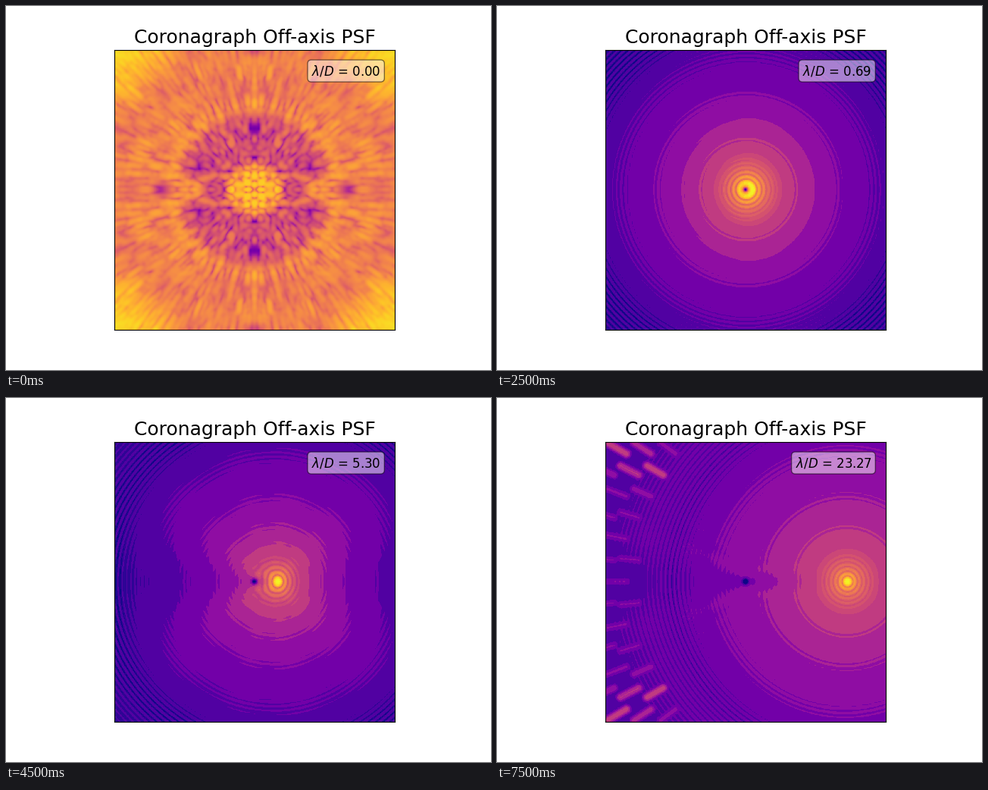
Recreate the animation shown at these times as a matplotlib script. Size 640 px wide and 480 px high, loop 8 s.

```python
import numpy as np
import matplotlib.pyplot as plt
from matplotlib.animation import FuncAnimation
from matplotlib.colors import ListedColormap

# Off-axis response of a charge-6 vortex coronagraph, 10% bandwidth.
# All lengths are in units of lambda/D.
HALF = 32.0
NPIX = 256
CHARGE = 6
WAVES = np.linspace(0.95, 1.05, 5)
OFFSETS = [0, 0.13, 0.23, 0.33, 0.49, 0.69, 1.04, 1.60, 2.63, 5.30,
           8.27, 11.27, 14.27, 17.27, 20.27, 23.27]
PX = 2 * HALF / 369.6  # lambda/D per screen pixel

ax1 = (np.arange(NPIX) + 0.5) / NPIX * 2 * HALF - HALF
X, Y = np.meshgrid(ax1, ax1)
R = np.hypot(X, Y)

DR = 0.1
r_polar = np.arange(0, 46.5, DR)
N_TH = 601
theta = np.clip(np.linspace(0, np.pi, N_TH), 1e-4, np.pi - 1e-4)
orders = np.arange(CHARGE // 2 + 1, 121)
# Chebyshev U of the shifted order: the vortex lowers each term by charge/2
cheb = np.sin(np.outer(orders - CHARGE // 2, theta)) / np.sin(theta)


def bessel(x):
    """J_n(x) for every needed order, from the generating function."""
    tau = 2 * np.pi * np.arange(512) / 512
    wave = np.exp(1j * np.outer(x, np.sin(tau)))
    return (np.fft.fft(wave, axis=1).real / 512)[:, orders]


def over_x(x):
    x = np.maximum(np.atleast_1d(x), 1e-3)
    return bessel(x) / x[:, None]


radial = [over_x(np.pi * r_polar / w) for w in WAVES]

# bilinear lookup from the polar grid to the pixels
fr = R / DR
ft = np.abs(np.arctan2(Y, X)) / np.pi * (N_TH - 1)
ir = fr.astype(int)
it = np.minimum(ft.astype(int), N_TH - 2)
fr, ft = fr - ir, ft - it


def to_pixels(p):
    lo = p[ir, it] * (1 - ft) + p[ir, it + 1] * ft
    hi = p[ir + 1, it] * (1 - ft) + p[ir + 1, it + 1] * ft
    return lo * (1 - fr) + hi * fr


def vortex_psf(alpha):
    total = 0
    for w, table in zip(WAVES, radial):
        coef = 4 * orders * over_x(np.pi * alpha / w)[0]
        total = total + ((table * coef) @ cheb) ** 2
    return 10 ** to_pixels(np.log10(total / len(WAVES) + 1e-18))


def step(x, a, b):
    t = np.clip((x - a) / (b - a), 0, 1)
    return t * t * (3 - 2 * t)


def speckles():
    """Residual on-axis light, mirror symmetric, as colour values 0..1."""
    rng = np.random.default_rng(11)
    n = 260
    k = np.pi * np.sqrt(rng.random(n))
    ang = rng.random(n) * np.pi / 2
    amp = rng.normal(size=n) + 1j * rng.normal(size=n)
    u, v = k * np.cos(ang), k * np.sin(ang)
    light = 0
    for w in np.linspace(0.95, 1.05, 9):
        cx = np.cos(np.outer(ax1 / w, u))
        cy = np.cos(np.outer(ax1 / w, v))
        light = light + np.abs((cy * amp) @ cx.T) ** 2
    grain = np.log10(light / np.median(light))

    x, y, r = np.abs(X) / PX, np.abs(Y) / PX, R / PX
    up = (y / (r + 1)) ** 2
    base = 0.69 + 0.0 * r
    ring = step(r, 28, 40) * (1 - step(r, 92, 108))
    base -= ring * (0.08 + 0.07 * up)
    base += 0.11 * (1 - step(r, 28, 40))
    base += 0.04 * np.exp(-((r - 112) / 8) ** 2)
    base += 0.24 * step(x * y / 185 ** 2, 0.4, 0.95)

    def spot(px, py, sx, sy, h):
        return h * np.exp(-((x - px) / sx) ** 2 - ((y - py) / sy) ** 2)

    base += spot(0, 81, 7, 9, -0.42) + spot(120, 0, 14, 10, -0.32)
    base += spot(63, 32, 20, 11, -0.16) + spot(0, 184, 14, 8, -0.22)
    base += spot(155, 0, 14, 12, -0.08) + spot(88, 0, 16, 9, 0.12)
    contrast = 0.16 + 0.04 * ring
    return np.clip(base + contrast * np.clip(grain, -2, 0.6), 0.02, 0.95)


def dashes(alpha):
    """Wavelength-smeared hexagonal grid orders far from the star."""
    out = np.zeros_like(X)
    dx = 33.8 * PX
    dy = dx * np.sqrt(3) / 2
    for row in range(-6, 7):
        for col in range(5, 11):
            gx, gy = -(col - 0.5 * (row % 2)) * dx, row * dy
            dist = np.hypot(gx, gy)
            if dist < 48.8 or dist > 62 or alpha + gx < -HALF - 4:
                continue
            ux, uy = gx / dist, gy / dist
            rx, ry = X - alpha - gx, Y - gy
            along = np.abs(rx * ux + ry * uy)
            d2 = (np.maximum(along - 0.042 * dist, 0) ** 2
                  + (rx * uy - ry * ux) ** 2)
            deg = np.degrees(np.arctan2(abs(gy), -gx))
            level = -5.8 + 1.6 * np.exp(-((deg - 29.5) / 5) ** 2)
            out += 10 ** level * np.exp(-d2 / 0.5 ** 2)
    return out


RESIDUAL = speckles()


def picture(alpha):
    if alpha == 0:
        return RESIDUAL
    light = vortex_psf(alpha) + 5e-10 * 10 ** (5 * (RESIDUAL - 1))
    light = light / light.max() + dashes(alpha)
    decades = np.interp(alpha, [0.1, 0.7, 1.6, 5.3, 17, 24],
                        [5.5, 5.4, 5.6, 6.6, 7.7, 7.6])
    return np.clip(1 + np.log10(light) / decades, 0, 1)


def banded():
    v = np.linspace(0, 1, 256)
    coarse = np.floor(v / 0.08) * 0.08 + 0.06
    fine = np.floor(v / 0.04) * 0.04 + 0.02
    q = np.where(v < 0.44, coarse, fine)
    q[v < 0.02] = 0
    return ListedColormap(plt.get_cmap("plasma")(q))


SMOOTH, BANDS = plt.get_cmap("plasma"), banded()
images = [picture(a) for a in OFFSETS]

plt.rcParams["font.family"] = "DejaVu Sans"
fig, ax = plt.subplots(figsize=(6.4, 4.8), dpi=100)
im = ax.imshow(images[0], cmap=SMOOTH, vmin=0, vmax=1, origin="lower")
ax.set_xticks([])
ax.set_yticks([])
ax.set_title("Coronagraph Off-axis PSF", fontsize=18)
label = ax.text(0.95, 0.95, "", transform=ax.transAxes, fontsize=12,
                ha="right", va="top",
                bbox=dict(boxstyle="round", facecolor="white", alpha=0.5))


def update(i):
    im.set_data(images[i])
    im.set_cmap(BANDS if i else SMOOTH)
    label.set_text(rf"$\lambda/D$ = {OFFSETS[i]:.2f}")
    return im, label


anim = FuncAnimation(fig, update, frames=len(OFFSETS), interval=500,
                     repeat=True, repeat_delay=0)
plt.show()
```
